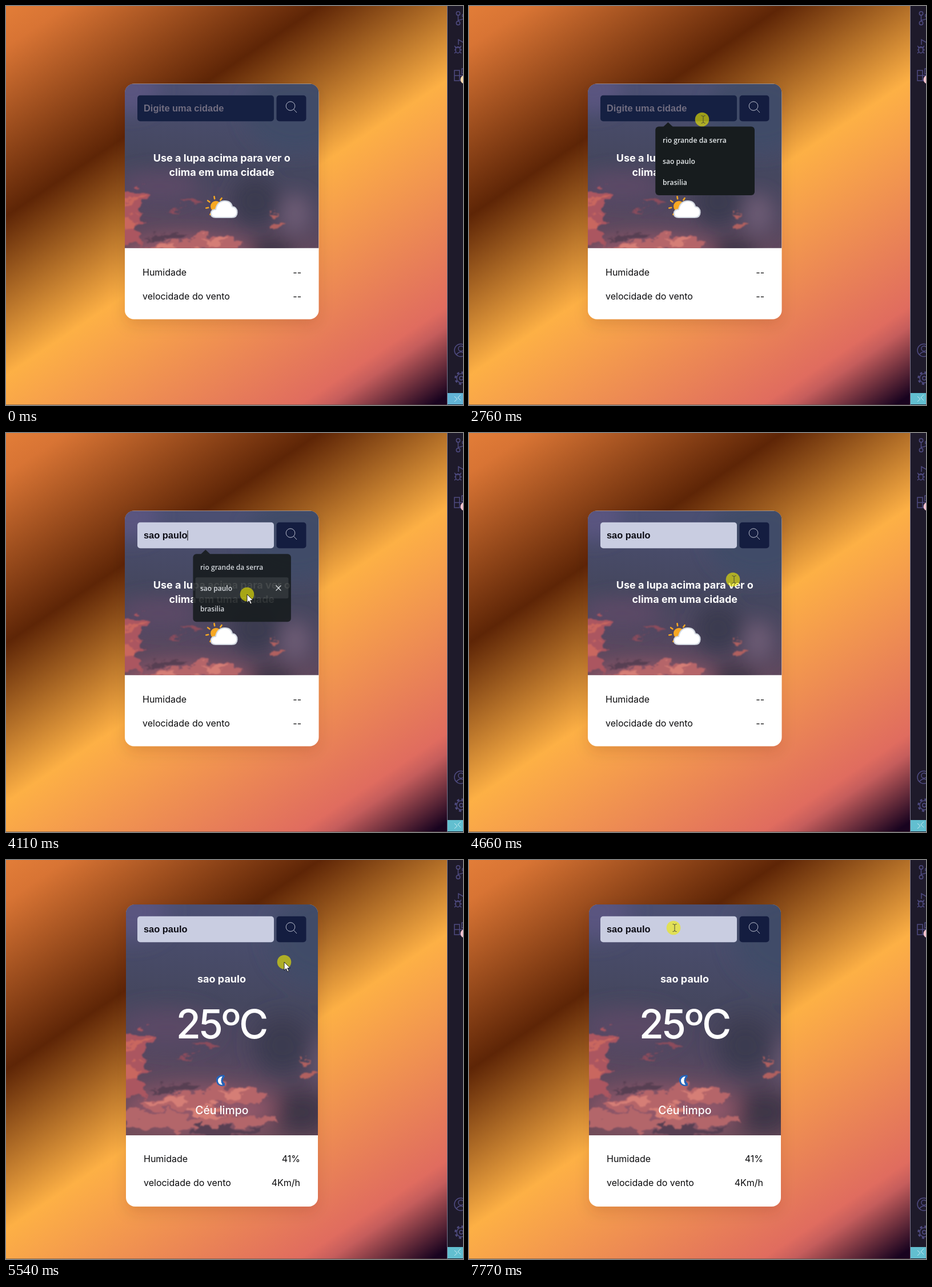
Animation of 800 by 700 pixels, one loop 8000 ms. Source, as an HTML page:

```html
<!DOCTYPE html>
<html lang="pt">
<head>
<meta charset="utf-8">
<title>Clima</title>
<style>
  html, body { margin: 0; width: 100%; height: 100%; overflow: hidden; background: #1e1a2a; }
  svg { display: block; width: 800px; height: 700px; }
  .ui { font-family: Inter, sans-serif; font-size: 16px; fill: #0b0b0d; }
  .head { font-size: 18px; font-weight: 650; fill: #fff; text-anchor: middle; }
  .end { text-anchor: end; }
  .field { font: bold 16.4px "Liberation Sans", Arial, sans-serif; }
  .menu { font: 600 12.2px "Open Sans", sans-serif; fill: #e4e8ea; }
  .icon { fill: none; stroke: #4f4b80; stroke-width: 1.5; }
</style>
</head>
<body>
<svg viewBox="0 0 800 700" xmlns="http://www.w3.org/2000/svg">
  <defs>
    <linearGradient id="bg" gradientUnits="userSpaceOnUse" x1="0" y1="0" x2="555" y2="828">
      <stop offset="0" stop-color="#e27d38"/>
      <stop offset=".06" stop-color="#d87434"/>
      <stop offset=".307" stop-color="#5e2506"/>
      <stop offset=".54" stop-color="#fdb045"/>
      <stop offset=".87" stop-color="#e06c5f"/>
      <stop offset=".9" stop-color="#c55d5c"/>
      <stop offset="1" stop-color="#18031f"/>
    </linearGradient>
    <linearGradient id="air" x1="0.1" y1="0" x2="0" y2="1">
      <stop offset="0" stop-color="#4b4f72"/>
      <stop offset=".38" stop-color="#45475f"/>
      <stop offset=".6" stop-color="#514760"/>
      <stop offset=".8" stop-color="#64495d"/>
      <stop offset="1" stop-color="#704c58"/>
    </linearGradient>
    <filter id="soft" x="-50%" y="-50%" width="200%" height="200%"><feGaussianBlur stdDeviation="16"/></filter>
    <filter id="ragged" x="-10%" y="-20%" width="120%" height="140%" color-interpolation-filters="sRGB">
      <feTurbulence type="fractalNoise" baseFrequency=".035 .06" numOctaves="4" seed="7"/>
      <feDisplacementMap in="SourceGraphic" scale="34" xChannelSelector="R" yChannelSelector="G"/>
      <feGaussianBlur stdDeviation=".8"/>
    </filter>
    <filter id="shade" x="-20%" y="-20%" width="140%" height="140%">
      <feDropShadow dx="0" dy="10" stdDeviation="12" flood-color="#3c1c00" flood-opacity=".13"/>
    </filter>
    <g id="sky">
      <rect width="340" height="340" fill="url(#air)"/>
      <g filter="url(#soft)">
        <ellipse cx="10" cy="10" rx="50" ry="40" fill="#5a5480"/>
        <ellipse cx="300" cy="50" rx="90" ry="70" fill="#3f4c68"/>
        <ellipse cx="60" cy="180" rx="70" ry="26" fill="#5b4a66"/>
        <ellipse cx="228" cy="206" rx="42" ry="44" fill="#3a3b50"/>
        <ellipse cx="298" cy="228" rx="24" ry="34" fill="#6d5c74"/>
        <ellipse cx="256" cy="304" rx="42" ry="34" fill="#3c3546"/>
        <ellipse cx="110" cy="300" rx="110" ry="32" fill="#94596a"/>
      </g>
      <g filter="url(#ragged)">
        <path fill="#ab5660" d="M-12 192Q18 180 42 190L32 206 22 220 30 240 14 254 26 270 34 282-12 286Z"/>
        <path fill="#c9675f" d="M-10 214L22 205 34 191 12 199-10 202ZM-8 236L20 233 18 252-8 250Z"/>
        <path fill="#8d4c5c" d="M102 210Q118 200 138 208L124 215ZM74 222L106 219 92 227Z"/>
        <path fill="#b0605f" d="M254 250Q268 234 286 240L276 250 262 258ZM250 230L262 226 260 234Z"/>
        <path fill="#b56569" d="M20 292Q60 274 96 278L130 264 170 268 206 278 196 294 150 290 110 304 60 300Z"/>
        <path fill="#d57e76" d="M128 272L166 268 178 276 150 282ZM30 288L72 280 96 288 60 294ZM86 302L126 296 150 304 110 312Z"/>
        <path fill="#b3666a" d="M0 304Q60 296 90 312L150 306 206 312 222 326 150 322 90 330 0 322Z"/>
        <path fill="#573f52" d="M36 270L90 262 110 268 70 276ZM110 322L200 330 160 340 90 340Z"/>
      </g>
    </g>
    <g id="arrow">
      <path d="M0 0V14.6L3.4 11.5 5.8 17 8.2 16 5.8 10.6H10.4Z" fill="#fff" stroke="#111" stroke-width=".9"/>
    </g>
    <path id="beam" d="M-1.5-6.5Q1.5-6.5 2-5 2.5-6.5 5.5-6.5M2-5V5M-1.5 6.5Q1.5 6.5 2 5 2.5 6.5 5.5 6.5" fill="none" stroke="#4a4a35" stroke-width="1"/>
  </defs>

  <rect width="800" height="700" fill="url(#bg)"/>
  <path d="M0 699.5H772" stroke="#5d4a44" opacity=".6"/>

  <g id="side">
    <rect x="772" width="28" height="700" fill="#1e1a2a"/>
    <path d="M772.5 0V700" stroke="#74748a"/>
    <g class="icon">
      <circle cx="791.5" cy="13" r="3.2"/><circle cx="791.5" cy="30" r="3.2"/><circle cx="802" cy="17" r="3.2"/>
      <path d="M791.5 16V27M802 20Q801 24 792 25"/>
      <path d="M792 68V59L804 66M786 73H796M785 77H788M794 77H798M785 70L788 73M797 70L794 73M785 83L788 80M797 83L794 80"/>
      <ellipse cx="791" cy="77" rx="4" ry="5.5"/>
      <path d="M785 113H794V131H785ZM785 122H803V131H794M798 110H808V119H798Z"/>
      <circle cx="796" cy="604" r="11"/><circle cx="796.5" cy="601" r="4.6"/><path d="M788 612Q796 602 805 612"/>
      <circle cx="797" cy="653" r="3.2"/>
      <circle cx="797" cy="653" r="8"/>
      <circle cx="797" cy="653" r="10.3" stroke-width="3" stroke-dasharray="4 4.09"/>
    </g>
    <circle id="badge" cx="803" cy="129" r="7.5"/>
    <rect id="status" x="773" y="679" width="27" height="20"/>
    <path d="M785 685L790 689.5 785 694M796 682L791 687 796 692" fill="none" stroke="#c9eaf2"/>
  </g>

  <g id="cards"></g>

  <g id="form">
    <rect id="box" x="230" y="156.7" width="239" height="45.6" rx="5"/>
    <rect x="473.5" y="156.7" width="52" height="45.6" rx="5" fill="#141d40"/>
    <g fill="none" stroke="#b9bdcd"><circle cx="498" cy="175.5" r="7.8"/><path d="M503.6 181.2L509 187"/></g>
    <text id="value" class="field" x="241" y="185"></text>
    <path id="caret" d="M0 171V188.5" stroke-width="1.1"/>
  </g>

  <g id="menu">
    <path d="M340 212L348.5 204 357 212Z" fill="#171c1e"/>
    <rect x="326.3" y="211.5" width="173.7" height="120.5" rx="6" fill="#171c1e"/>
    <g id="hover">
      <rect x="330.5" y="253" width="165" height="37.5" rx="3" fill="#2e3335"/>
      <path d="M473.3 267.5L482.3 276.5M482.3 267.5L473.3 276.5" stroke="#e4e8ea" stroke-width="1.4"/>
    </g>
    <g id="rows" class="menu"></g>
  </g>

  <g id="mouse">
    <circle id="halo" r="12.3" fill="#f0eb00" opacity=".62"/>
    <use id="pArrow" href="#arrow"/>
    <use id="pBeam" href="#beam"/>
  </g>
</svg>
<script>
const LOOP = 8000, PICK = 4110, RESULT = 5490;
const $ = id => document.getElementById(id);
const set = (id, attrs) => { for (const k in attrs) $(id).setAttribute(k, attrs[k]); };
const show = (id, on) => $(id).setAttribute('visibility', on ? 'visible' : 'hidden');
const text = (x, y, s, cls = '', style = '') => `<text x="${x}" y="${y}" class="${cls}" style="${style}">${s}</text>`;

function card(id, x, y, w, h, photo, zoom, inner) {
  return `<g id="${id}" class="ui">
    <clipPath id="${id}Clip"><rect x="${x}" y="${y}" width="${w}" height="${h}" rx="16"/></clipPath>
    <clipPath id="${id}Top"><rect x="${x}" y="${y}" width="${w}" height="${photo}"/></clipPath>
    <rect x="${x}" y="${y}" width="${w}" height="${h}" rx="16" fill="#fff" filter="url(#shade)"/>
    <g clip-path="url(#${id}Clip)"><g clip-path="url(#${id}Top)">
      <use href="#sky" transform="translate(${x} ${y}) scale(${zoom})"/>
    </g></g>${inner}</g>`;
}

const rays = Array.from({ length: 8 }, (_, i) =>
  `<path d="M0-13.5V-17.5" transform="rotate(${i * 45 - 10})"/>`).join('');
const sun = `<g transform="translate(367.5 351.5)" stroke="#f7a823" stroke-width="2.6" stroke-linecap="round">
    ${rays}<circle r="9.5" fill="#f7a823" stroke="none"/></g>
  <path d="M367 371Q359 371 359 364T367 357Q370 342 383 342 394 342 396 352 404.500 353 404.500 362 404.500 371 395 371Z"
    fill="#fff" stroke="#d3d9e1" stroke-width="2.2"/>`;
const moon = `<path d="M382 377Q366 377 368 388 370 399 383 396L383 392Q376 387 383 380Z" fill="#2563b8"/>
  <path d="M379 379.500Q370.500 381 371 388 372 394 379 394.500 373.800 387 379 379.500Z" fill="#fff"/>`;

$('cards').innerHTML =
  card('idle', 208, 136.5, 339.5, 413, 288.3, 1,
    text(377.8, 273, 'Use a lupa acima para ver o', 'head') +
    text(377.8, 298, 'clima em uma cidade', 'head') + sun +
    text(239, 472.5, 'Humidade') + text(517, 472.5, '--', 'end') +
    text(239, 514.5, 'velocidade do vento') + text(517, 514.5, '--', 'end')) +
  card('result', 210, 78, 336, 530, 405, 1.2,
    text(377.5, 215, 'sao paulo', 'head') +
    text(377, 313, '25ºC', 'head', 'font-size:70px;font-weight:500;letter-spacing:-3px') + moon +
    text(377.8, 445.5, 'Céu limpo', 'head', 'font-size:19.4px;font-weight:500') +
    text(241, 530, 'Humidade') + text(515, 530, '41%', 'end') +
    text(241, 572, 'velocidade do vento') + text(515, 572, '4Km/h', 'end'));

const cities = ['rio grande da serra', 'sao paulo', 'brasilia'];
$('rows').innerHTML = cities.map((c, i) => text(339, 240 + i * 37, c)).join('');

// Pointer path: time, x, y
const path = [
  [640, 731, 660], [860, 640, 520], [1100, 500, 330], [1250, 445, 255], [1400, 419, 221],
  [1470, 417, 217], [1600, 417, 217], [2010, 408, 199], [3010, 408, 199], [3080, 409, 222],
  [3220, 414, 278], [3280, 414, 278], [3350, 416, 308], [3570, 416, 308], [3840, 422, 283],
  [4170, 422, 283], [4400, 440, 276], [4660, 462, 257], [4730, 462, 257], [4870, 475, 239],
  [4940, 477, 232], [5220, 487, 179], [7210, 487, 179], [7770, 358, 119], [LOOP, 358, 119]
];

function pointer(t) {
  const i = Math.max(1, path.findIndex(p => p[0] > t));
  const [a, b] = [path[i - 1], path[i]];
  const k = Math.max(0, (t - a[0]) / (b[0] - a[0]));
  return [a[1] + (b[1] - a[1]) * k, a[2] + (b[2] - a[2]) * k];
}

function draw(t) {
  const [x, y] = pointer(t);
  const picked = t >= PICK, done = t >= RESULT;

  show('idle', !done);
  show('result', done);
  set('form', { transform: `translate(0 ${done ? -58 : 0})` });

  const fade = picked ? (t - PICK + 20) / 200 : 0;
  const open = t >= 2210 && fade < 1;
  let row = t < 3010 ? -1 : Math.floor((y - 216) / 37);
  if (picked) row = 1;
  const hot = open && row >= 0 && row < 3;
  $('menu').style.display = open ? '' : 'none';
  $('hover').style.display = hot ? '' : 'none';
  set('menu', {
    opacity: 1 - fade,
    transform: `translate(413 271) scale(${1 - fade * .12}) translate(-413 -271)`
  });
  set('hover', { transform: `translate(0 ${(row - 1) * 37})` });

  const value = $('value');
  value.textContent = picked ? 'sao paulo' : hot ? cities[row] : 'Digite uma cidade';
  value.style.font = hot && !picked ? '13.6px "Liberation Sans", Arial, sans-serif' : '';
  set('value', { fill: picked || hot ? '#0c0c14' : '#716d80' });
  set('box', { fill: picked || hot ? '#c9cde1' : '#152042' });

  const blink = Math.floor((t - (picked ? PICK : 2210)) / 550) % 2 === 0;
  show('caret', t >= 2210 && !done && blink);
  set('caret', {
    transform: `translate(${picked ? 318 : 241.5} 0)`,
    stroke: picked || hot ? '#111' : '#fff'
  });

  set('badge', { fill: t < 2210 ? '#ffdcb2' : '#f4c3cf' });
  set('status', { fill: t < 2210 ? '#62b4d6' : '#62bfd0' });

  const beam = done ? y < 144 && x < 469 : y < 202 && t < 3010 || t >= 3010 && y < 202 && x < 469
    || t > 4310 && y > 253;
  show('mouse', t >= 640);
  $('halo').style.display = t < 1950 ? 'none' : '';
  $('pArrow').style.display = beam ? 'none' : '';
  $('pBeam').style.display = beam ? '' : 'none';
  set('mouse', { transform: `translate(${x.toFixed(2)} ${y.toFixed(2)})` });
}

const start = performance.now();
function tick(now) {
  draw(Math.max(0, now - start) % LOOP);
  requestAnimationFrame(tick);
}
draw(0);
requestAnimationFrame(tick);
</script>
</body>
</html>
```
